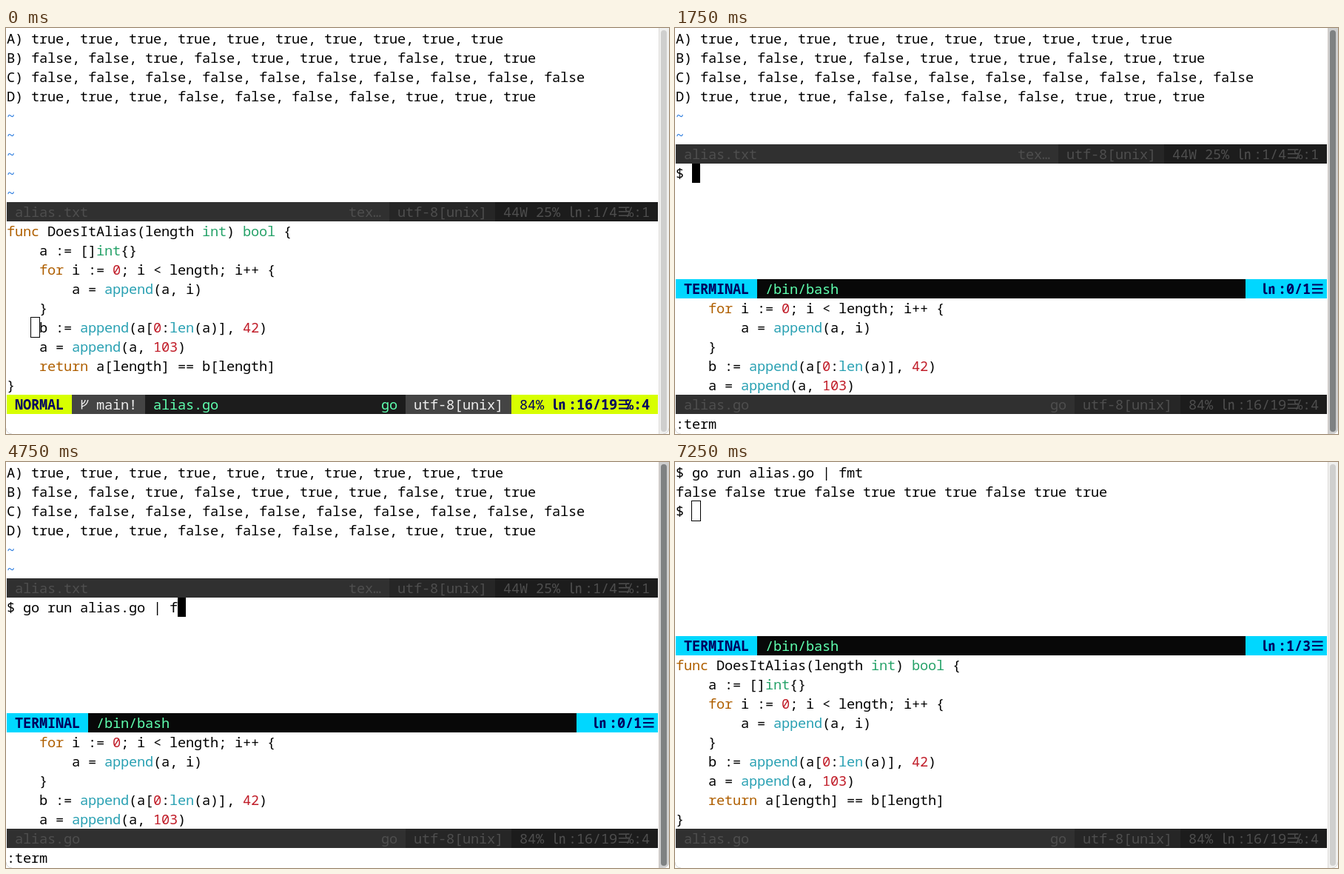
An HTML page with a canvas for the animation above (7500 ms loop, 896 by 548 pixels).

```html
<!DOCTYPE html>
<html lang="en">
<head>
<meta charset="utf-8">
<title>Terminal session</title>
<style>
html, body { margin: 0; width: 100%; height: 100%; overflow: hidden; background: #fff; }
canvas { display: block; width: 896px; height: 548px; }
</style>
</head>
<body>
<canvas id="stage" width="896" height="548"></canvas>
<script>
const g = document.getElementById('stage').getContext('2d');
const CW = 11, RH = 26, COLS = 80, STEP = 250, STEPS = 30;
const FONT = '18.667px "Noto Sans Mono", "Noto Sans CJK SC", "Noto Sans CJK JP", "DejaVu Sans Mono", monospace';
const BLACK = '#000', MINT = '#5fffaf', NAVY = '#00005f', DIM = '#4e4e4e';
const MODES = { NORMAL: '#d7ff00', COMMAND: '#00d700', TERMINAL: '#00d7ff' };
const COMMAND = 'go run alias.go | fmt';
const OUTPUT = 'false false true false true true true false true true';

const ANSWERS = [
  'A) true, true, true, true, true, true, true, true, true, true',
  'B) false, false, true, false, true, true, true, false, true, true',
  'C) false, false, false, false, false, false, false, false, false, false',
  'D) true, true, true, false, false, false, false, true, true, true'
];
const CODE = [
  'func DoesItAlias(length int) bool {',
  '    a := []int{}',
  '    for i := 0; i < length; i++ {',
  '        a = append(a, i)',
  '    }',
  '    b := append(a[0:len(a)], 42)',
  '    a = append(a, 103)',
  '    return a[length] == b[length]',
  '}'
];
const SYNTAX = [
  [/^(func|for|return)$/, '#af5f00'],
  [/^(int|bool)$/, '#26a269'],
  [/^(append|len)$/, '#2aa1b3'],
  [/^\d+$/, '#c01c28']
];
const TXT = { name: 'alias.txt', type: 'tex…', pos: '44W 25%', line: '㏑:1/4☰℅:1' };
const GO = { name: 'alias.go', type: 'go', pos: '84%', line: '㏑:16/19☰℅:4' };

const px = col => 1 + col * CW;
const py = row => 1 + row * RH;
const isWide = ch => ch === '㏑';
const cells = s => [...s].reduce((n, ch) => n + (isWide(ch) ? 2 : 1), 0);

function bars(x, y, bold) {
  for (const dy of [6.5, 12, 17.5]) g.fillRect(x + 2, y + dy, 14.5, bold ? 2 : 1.5);
}

function branch(x, y, color) {
  g.strokeStyle = color;
  g.lineWidth = 1.5;
  g.beginPath();
  g.moveTo(x + 2.5, y + 7);
  g.lineTo(x + 2.5, y + 19.5);
  g.moveTo(x + 2.5, y + 12.5);
  g.quadraticCurveTo(x + 6.5, y + 11.5, x + 7, y + 7);
  g.moveTo(x + 2.5, y + 16);
  g.quadraticCurveTo(x + 10, y + 14, x + 10.8, y + 7);
  g.stroke();
}

function text(col, row, s, color = BLACK, bold = false) {
  g.font = (bold ? 'bold ' : '') + FONT;
  g.fillStyle = color;
  const y = py(row);
  for (const ch of s) {
    const x = px(col);
    if (ch === '☰') bars(x, y, bold);
    else if (ch === 'ᚠ') branch(x, y, color);
    else if (ch !== ' ') g.fillText(ch, x, y + 20);
    col += isWide(ch) ? 2 : 1;
  }
  return col;
}

function fill(from, to, row, color) {
  g.fillStyle = color;
  g.fillRect(px(from), py(row), (to - from) * CW, RH);
}

function code(row, line) {
  let col = 0;
  for (const word of line.match(/\w+|\W+/g)) {
    const rule = SYNTAX.find(([re]) => re.test(word));
    col = text(col, row, word, rule ? rule[1] : BLACK);
  }
}

function fileStatus(row, file, mode) {
  const zStart = COLS - cells(file.pos + file.line) - 3;
  const yStart = zStart - 13;
  const main = mode ? MINT : DIM;
  fill(0, COLS, row, mode ? '#1c1c1c' : '#303030');
  fill(yStart, zStart, row, mode ? '#444444' : '#262626');
  fill(zStart, COLS, row, mode ? MODES[mode] : '#1c1c1c');
  let col = 0;
  if (mode) {
    const end = mode.length + 2;
    fill(0, end, row, MODES[mode]);
    text(1, row, mode, NAVY, true);
    fill(end, end + 9, row, '#444444');
    text(end + 1, row, 'ᚠ main!', '#eeeeee');
    col = end + 9;
  }
  text(col + 1, row, file.name, main);
  text(yStart - file.type.length - 1, row, file.type, main);
  text(yStart + 1, row, 'utf-8[unix]', mode ? '#eeeeee' : DIM);
  col = text(zStart + 1, row, file.pos, mode ? NAVY : DIM);
  text(col + 1, row, file.line, mode ? NAVY : DIM, !!mode);
}

function termStatus(row, pos, active) {
  const bg = active ? MODES.TERMINAL : '#1c1c1c', fg = active ? NAVY : DIM;
  fill(0, COLS, row, '#080808');
  fill(0, 10, row, bg);
  fill(70, COLS, row, bg);
  text(1, row, 'TERMINAL', fg, active);
  text(11, row, '/bin/bash', MINT);
  text(72, row, '㏑:' + pos + '☰', fg, active);
}

function cursor(col, row, focused, ch = ' ') {
  if (focused) {
    fill(col, col + 1, row, BLACK);
    text(col, row, ch, '#fff');
  } else {
    g.strokeStyle = BLACK;
    g.lineWidth = 1;
    g.strokeRect(px(col) - 0.5, py(row) - 0.5, CW + 1, RH + 1);
  }
}

function answers(statusRow, mode) {
  for (let r = 0; r < statusRow; r++) {
    if (ANSWERS[r]) text(0, r, ANSWERS[r]);
    else text(0, r, '~', '#2a7bde');
  }
  fileStatus(statusRow, TXT, mode);
}

function source(row, first, mode) {
  for (let i = first; row < 19; i++) code(row++, CODE[i]);
  fileStatus(19, GO, mode);
}

function shell(row, typed, done) {
  text(0, row, '$ ' + typed);
  if (done) {
    text(0, row + 1, OUTPUT);
    text(0, row + 2, '$');
  }
}

function editing(n, focused) {
  const keys = [0, 0, 1, 2, 3, 5, 5][n];
  answers(9);
  source(10, 0, keys ? 'COMMAND' : 'NORMAL');
  text(0, 20, ':term'.slice(0, keys));
  if (!keys) cursor(3, 15, focused);
  else if (n === 6) cursor(0, 20, true, ':');
  else cursor(keys, 20, true);
}

function running(n) {
  const done = n >= 23, entered = n >= 22, left = n >= 25;
  const count = n === 21 ? 21 : Math.min(20, Math.round(5 + (n - 10) * 14 / 9));
  const typed = entered ? COMMAND : COMMAND.slice(0, count);
  answers(6, n === 25 ? 'NORMAL' : n === 26 ? 'COMMAND' : '');
  shell(7, typed, done);
  termStatus(13, left ? '1/3' : done ? '1/1' : '0/1', !left);
  source(14, 2);
  if (n === 25) cursor(0, 0, true, 'A');
  else if (n === 26) {
    text(0, 20, ':q');
    cursor(0, 20, true, ':');
  } else {
    text(0, 20, ':term');
    if (done) cursor(2, 9, true);
    else if (entered) cursor(0, 8, true);
    else cursor(2 + typed.length, 7, true);
  }
}

function finished(focused) {
  shell(0, COMMAND, true);
  termStatus(9, '1/3', true);
  source(10, 0);
  cursor(2, 2, focused);
}

function scrollbar(focused) {
  g.fillStyle = focused ? '#cecece' : '#f0f0ef';
  g.fillRect(882, 0, 14, 548);
  g.fillStyle = focused ? '#cdc7c2' : '#dddad7';
  g.fillRect(882, 0, 1, 548);
  g.fillStyle = focused ? '#7e8182' : '#cfcfce';
  g.beginPath();
  g.roundRect(885, 3, 8, 542, 4);
  g.fill();
}

function draw(n) {
  const focused = n > 0 && n < 29;
  g.fillStyle = '#fff';
  g.fillRect(0, 0, 896, 548);
  g.save();
  g.beginPath();
  g.roundRect(0, 0, 896, 548, [0, 0, 8, 8]);
  g.clip();
  if (n < 7) editing(n, focused);
  else if (n < 27) running(n);
  else finished(focused);
  scrollbar(focused);
  g.restore();
  g.strokeStyle = '#d8d8d8';
  g.lineWidth = 1;
  g.beginPath();
  g.arc(8, 540, 8, Math.PI / 2, Math.PI);
  g.moveTo(896, 540);
  g.arc(888, 540, 8, 0, Math.PI / 2);
  g.stroke();
}

function tick() {
  draw(Math.floor(performance.now() / STEP) % STEPS);
  requestAnimationFrame(tick);
}
tick();
</script>
</body>
</html>
```
